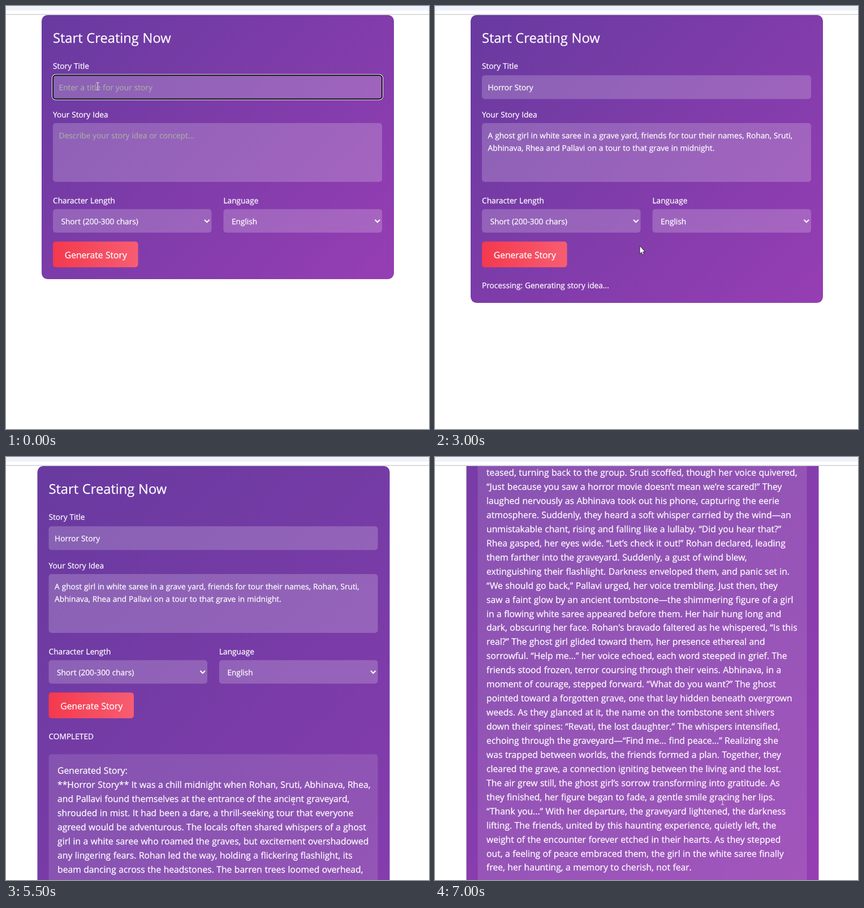
Animation, 748 px wide and 748 px high, one loop 8000 ms. Source, as an HTML page:

```html
<!DOCTYPE html>
<html lang="en">
<head>
<meta charset="utf-8">
<title>Story form</title>
<style>
  html, body { margin: 0; width: 100%; height: 100%; overflow: hidden; background: #fff; }
  #stage { position: relative; width: 748px; height: 748px; overflow: hidden; }
  #card {
    position: absolute; left: 62.5px; top: 15.6px; width: 623px; border-radius: 10.4px;
    background: linear-gradient(135deg, #683aa0, #963eb3);
  }
  svg { position: absolute; overflow: visible; }
  #form { left: -62.5px; top: -15.6px; }
  #pointer { left: 0; top: 0; }
  #bar {
    position: absolute; left: 0; top: 0; width: 748px; height: 13.6px;
    background: linear-gradient(#edf2fb 8px, #fff 8px); border-bottom: 2px solid #dcdce0;
  }
  text {
    font: 13.7px "Open Sans", "Noto Sans", sans-serif;
    word-spacing: .025em; white-space: pre; text-rendering: geometricPrecision;
    color: #fff; fill: currentColor; stroke: currentColor; stroke-width: .25px;
  }
  .heading { font-size: 23.7px; }
  .large { font-size: 15.66px; }
  .hint { color: #a9a9a9; }
  .box { fill: #fff; fill-opacity: .2; }
  .ring { fill: none; visibility: hidden; }
  .chevron { fill: none; stroke: #fff; stroke-width: 2; }
  .focused .ring { visibility: visible; }
  .select.focused .box { fill-opacity: .5; }
  .select.focused text { color: #000; }
  .select.focused .chevron { stroke: #000; }
</style>
</head>
<body>
<div id="stage">
  <div id="card"><svg id="form" width="748" height="1540">
    <defs>
      <linearGradient id="red"><stop stop-color="#f4394d"/><stop offset="1" stop-color="#f75d72"/></linearGradient>
    </defs>
  </svg></div>
  <div id="bar"></div>
  <svg id="pointer" width="748" height="748">
    <g id="beam" fill="none" stroke="#d5cbdc" stroke-width="1.2">
      <path d="M-3 -6.5H-1L0 -5.5L1 -6.5H3M0 -5.5V5.5M-3 6.5H-1L0 5.5L1 6.5H3"/>
    </g>
    <g id="arrow" fill="#fff" stroke="#222" stroke-width="1">
      <path d="M0 0V14.5L3.2 11.6L5.3 16L7.6 15L5.6 10.8H9.8Z"/>
    </g>
    <g id="hand" fill="#fff" stroke="#222" stroke-width="1.1" stroke-linejoin="round">
      <path d="M-2 1V-7Q-2 -9 -.7 -9Q.7 -9 .7 -7V-2.5Q3 -3.5 3.4 -1.7Q5.6 -2.6 6 -.8Q8 -1.2 8 1V4Q8 7 6 9H-1Q-2 6 -5.5 3Q-6 1 -4.5 .6Z"/>
    </g>
  </svg>
</div>
<script>
const STEP = 500, LOOP = 8000;
const $ = id => document.getElementById(id);
const form = $('form'), card = $('card');

function add(tag, attrs, parent = form) {
  const node = document.createElementNS('http://www.w3.org/2000/svg', tag);
  for (const key in attrs) node.setAttribute(key, attrs[key]);
  return parent.appendChild(node);
}

function write(x, y, content, style = '', parent = form) {
  const node = add('text', { x, y, class: style }, parent);
  node.textContent = content;
  return node;
}

function field(x, y, width, height, style = '') {
  const group = add('g', { class: style });
  add('rect', { x, y, width, height, rx: 5, class: 'box' }, group);
  const ring = (out, stroke, weight) => add('rect', {
    x: x - out, y: y - out, width: width + 2 * out, height: height + 2 * out,
    rx: 5 + out, class: 'ring', stroke, 'stroke-width': weight
  }, group);
  ring(1.4, '#fff', 1.2);
  ring(0, '#101014', 2);
  return group;
}

function select(x, content) {
  const group = field(x, 359.2, 280.5, 41.6, 'select');
  write(x + 14.4, 386, content, '', group);
  add('path', { d: `M${x + 268} 378l4.3 4.3l4.3 -4.3`, class: 'chevron' }, group);
  return group;
}

write(83, 65, 'Start Creating Now', 'heading');
write(83, 111, 'Story Title');
write(83, 197, 'Your Story Idea');
write(83, 349, 'Character Length');
write(384.5, 349, 'Language');

const fields = {
  title: field(83, 122.5, 582, 42),
  idea: field(83, 207, 582, 104),
  length: select(83, 'Short (200-300 chars)'),
  language: select(384.5, 'English')
};
const titleText = write(93.6, 149, '');
const ideaText = [write(93.6, 234, ''), write(93.6, 255.7, '')];
const IDEA = [
  'A ghost girl in white saree in a grave yard, friends for tour their names, Rohan, Sruti,',
  'Abhinava, Rhea and Pallavi on a tour to that grave in midnight.'
];

add('rect', { x: 83, y: 416.5, width: 150.5, height: 45.5, rx: 5, fill: 'url(#red)' });
write(103.8, 446, 'Generate Story', 'large');
const status = write(83, 499.2, '');

const list = add('g', {});
add('rect', { x: 384.5, y: 401, width: 280.5, height: 123, fill: '#fff' }, list);
add('rect', { x: 384.5, y: 401.5, width: 280.5, height: 20.4, fill: '#1967d2' }, list);
['English', 'Hindi', 'Telugu', 'Tamil', 'Kannada', 'Malayalam'].forEach((name, i) => {
  write(399, 416.5 + i * 20.4, name, '', list).style.color = i ? '#000' : '#fff';
});

const STORY = `Generated Story:
**Horror Story** It was a chill midnight when Rohan, Sruti, Abhinava, Rhea,
and Pallavi found themselves at the entrance of the ancient graveyard,
shrouded in mist. It had been a dare, a thrill-seeking tour that everyone
agreed would be adventurous. The locals often shared whispers of a ghost
girl in a white saree who roamed the graves, but excitement overshadowed
any lingering fears. Rohan led the way, holding a flickering flashlight, its
beam dancing across the headstones. The barren trees loomed overhead,
their branches creaking in the wind. “You guys are scared, aren’t you?” he
teased, turning back to the group. Sruti scoffed, though her voice quivered,
“Just because you saw a horror movie doesn’t mean we’re scared!” They
laughed nervously as Abhinava took out his phone, capturing the eerie
atmosphere. Suddenly, they heard a soft whisper carried by the wind—an
unmistakable chant, rising and falling like a lullaby. “Did you hear that?”
Rhea gasped, her eyes wide. “Let’s check it out!” Rohan declared, leading
them farther into the graveyard. Suddenly, a gust of wind blew,
extinguishing their flashlight. Darkness enveloped them, and panic set in.
“We should go back,” Pallavi urged, her voice trembling. Just then, they
saw a faint glow by an ancient tombstone—the shimmering figure of a girl
in a flowing white saree appeared before them. Her hair hung long and
dark, obscuring her face. Rohan's bravado faltered as he whispered, “Is this
real?” The ghost girl glided toward them, her presence ethereal and
sorrowful. “Help me...” her voice echoed, each word steeped in grief. The
friends stood frozen, terror coursing through their veins. Abhinava, in a
moment of courage, stepped forward. “What do you want?” The ghost
pointed toward a forgotten grave, one that lay hidden beneath overgrown
weeds. As they glanced at it, the name on the tombstone sent shivers
down their spines: “Revati, the lost daughter.” The whispers intensified,
echoing through the graveyard—“Find me... find peace...” Realizing she
was trapped between worlds, the friends formed a plan. Together, they
cleared the grave, a connection igniting between the living and the lost.
The air grew still, the ghost girl’s sorrow transforming into gratitude. As
they finished, her figure began to fade, a gentle smile gracing her lips.
“Thank you...” With her departure, the graveyard lightened, the darkness
lifting. The friends, united by this haunting experience, quietly left, the
weight of the encounter forever etched in their hearts. As they stepped
out, a feeling of peace embraced them, the girl in the white saree finally
free, her haunting, a memory to cherish, not fear.`;
const story = add('g', {});
add('rect', { x: 83, y: 525.5, width: 582, height: 979.5, rx: 5, fill: '#fff', 'fill-opacity': .12 }, story);
STORY.split('\n').forEach((line, i) => write(98.6, 560 + i * 24.94, line, 'large', story));

// Each entry lasts one STEP and changes only what it names; the last one holds.
const changes = [
  { focus: 'title', filled: false, status: '', cursor: ['beam', 162, 142] },
  { focus: 'idea', filled: true, cursor: ['beam', 300, 262] },
  { focus: 'length', cursor: ['arrow', 230, 384] },
  { focus: 'language', list: true, cursor: ['arrow', 470, 410] },
  { list: false, cursor: ['hand', 127.5, 444] },
  { focus: '', status: 'Processing: Generating story idea...', cursor: ['arrow', 362, 424] },
  {},
  { status: 'Processing: Expanding idea into story...' },
  { status: 'Processing: Refining story... (2/15)' },
  { status: 'Processing: Refining story... (8/15)' },
  { status: 'Processing: Refining story... (15/15)' },
  { status: 'COMPLETED', story: true, cursor: ['beam', 508.5, 608.5] },
  {},
  { scroll: 415.5 },
  { scroll: 751.3 }
];
const states = [];
changes.forEach((change, i) => states.push({ scroll: 0, ...states[i - 1], ...change }));

const show = (node, on) => { node.style.display = on ? '' : 'none'; };

function render(state) {
  for (const name in fields) fields[name].classList.toggle('focused', name === state.focus);
  titleText.textContent = state.filled ? 'Horror Story' : 'Enter a title for your story';
  ideaText[0].textContent = state.filled ? IDEA[0] : 'Describe your story idea or concept...';
  ideaText[1].textContent = state.filled ? IDEA[1] : '';
  for (const node of [titleText, ideaText[0]]) node.classList.toggle('hint', !state.filled);
  status.textContent = state.status;
  show(list, state.list);
  show(story, state.story);
  card.style.height = (state.story ? 1510 : state.status ? 509.4 : 467.4) + 'px';
  card.style.transform = `translate(${state.story ? -7.5 : 0}px, ${-state.scroll}px)`;
  const [kind, x, y] = state.cursor;
  for (const name of ['beam', 'arrow', 'hand']) show($(name), name === kind);
  $(kind).setAttribute('transform', `translate(${x} ${y})`);
}

const start = performance.now();
let current = -1;
function tick() {
  const time = (performance.now() - start) % LOOP;
  const index = Math.min(Math.floor(time / STEP), states.length - 1);
  if (index !== current) render(states[current = index]);
  requestAnimationFrame(tick);
}
tick();
</script>
</body>
</html>
```
